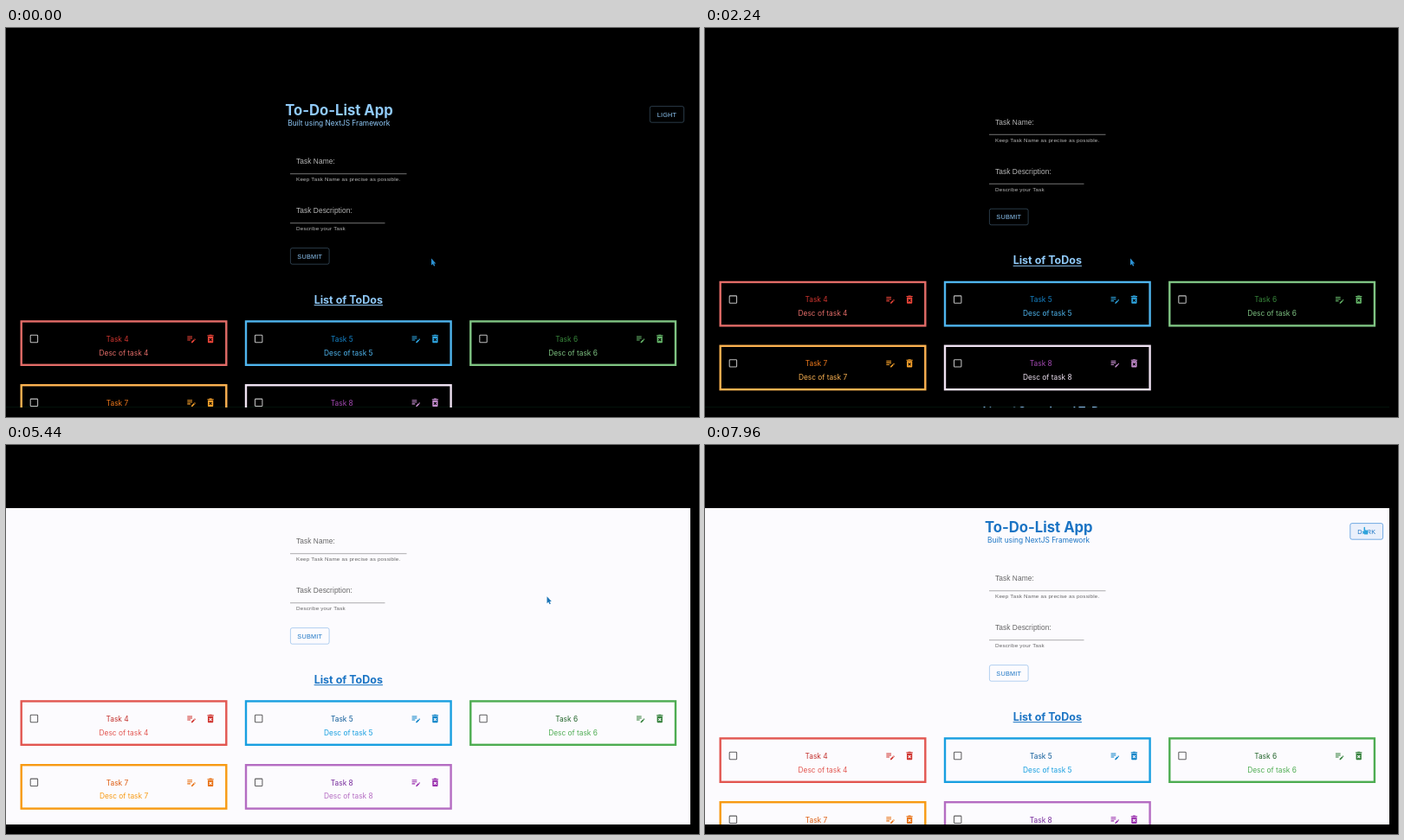
Recreate the animation shown at these times as an HTML page with a canvas. Size 800x450 px, loop 8000 ms.

```html
<!DOCTYPE html>
<html lang="en">
<head>
<meta charset="utf-8">
<title>To-Do list</title>
<style>
html, body { margin: 0; width: 100%; height: 100%; overflow: hidden; background: #000; }
canvas { display: block; width: 800px; height: 450px; }
</style>
</head>
<body>
<canvas id="stage" width="800" height="450"></canvas>
<script>
const ctx = document.getElementById('stage').getContext('2d');
const LOOP = 8000;
const S = 800 / 1536;
const SANS = '"Liberation Sans", Arial, sans-serif';
const INTER = 'Inter, sans-serif';

// Each palette entry is [light, main, dark].
const DARK = {
  bg: '#000', primary: '#90caf9', rgb: '144,202,249',
  label: 'rgba(255,255,255,.72)', line: 'rgba(255,255,255,.45)', box: 'rgba(255,255,255,.75)',
  outline: 0.32, button: 'LIGHT', buttonX: 743.3, arrow: '#2b8fd0',
  red: ['#e36c68', '#ee4539', '#d0352f'],
  blue: ['#4fb5ee', '#2fa8e4', '#1583c8'],
  green: ['#7fc483', '#66b86a', '#38883c'],
  orange: ['#fcb251', '#fba42c', '#f07a1c'],
  purple: ['#efe2f2', '#c88fd2', '#a54ab4']
};
const LIGHT = {
  bg: '#fcfbfe', primary: '#1b74c4', rgb: '25,118,210',
  label: 'rgba(0,0,0,.6)', line: 'rgba(0,0,0,.32)', box: 'rgba(0,0,0,.62)',
  outline: 0.36, button: 'DARK', buttonX: 744.8, arrow: '#1a74b6',
  red: ['#e25650', '#d0342f', '#c22e2a'],
  blue: ['#189fe0', '#0d84c8', '#0c5a98'],
  green: ['#4dac51', '#33803a', '#22642a'],
  orange: ['#f79a12', '#e87012', '#dd5a0c'],
  purple: ['#b46cc2', '#982cac', '#74279a']
};

const CARDS = ['red', 'blue', 'green', 'orange', 'purple'];
const DONE = ['green', 'blue', 'orange'];

const EDIT = new Path2D('M3 10h11v2H3zM3 8h11V6H3zM3 16h7v-2H3zM18.01 12.87l.71-.71c.39-.39 1.02-.39 1.41 0l.71.71c.39.39.39 1.02 0 1.41l-.71.71zM17.3 13.58l-5.3 5.3V21h2.12l5.3-5.3z');
const TRASH = new Path2D('M6 19c0 1.1.9 2 2 2h8c1.1 0 2-.9 2-2V7H6zM8.46 11.88l1.41-1.41L12 12.59l2.12-2.12 1.41 1.41L13.41 14l2.12 2.12-1.41 1.41L12 15.41l-2.12 2.12-1.41-1.41L10.59 14zM15.5 4l-1-1h-5l-1 1H5v2h14V4z');
const ARROW = new Path2D('M0 0V8L1.8 6.4L3 9L4.3 8.4L3.1 5.9H5.3z');
const HAND = new Path2D('M0 .8C0-.2 1.6-.2 1.6.8V3.4L4.4 4Q5.3 4.3 5.2 5.3L4.7 8.8H.6L-1.8 5.8C-2.2 5-1.2 4.4 0 5.4z');

// Keys are [time, value, ...].
const SCROLL = [
  [640, 0], [960, 90], [1530, 90], [1640, 0],
  [2080, 0], [2400, 90], [2720, 90], [2840, 0],
  [5080, 0], [5400, 43], [6799, 43], [6800, 0]
];
const POINTER = [
  [2940, 491, 266.5], [3340, 733, 151], [3540, 733, 151], [3980, 770.5, 105.5],
  [4600, 770.5, 105.5], [5040, 624.5, 175.2],
  [7360, 624.5, 175.2], [7760, 760.5, 94.8]
];
const THEME_AT = 4540, CLICK_AT = 4240;

function sample(keys, t) {
  const next = keys.findIndex(k => k[0] > t);
  if (next < 0) return keys[keys.length - 1].slice(1);
  if (next === 0) return keys[0].slice(1);
  const a = keys[next - 1], b = keys[next];
  const p = (t - a[0]) / (b[0] - a[0]);
  const e = p * p * (3 - 2 * p);
  return a.slice(1).map((v, i) => v + (b[i + 1] - v) * e);
}

function text(str, x, y, font, color, align = 'left', spacing = 0) {
  ctx.font = font;
  ctx.fillStyle = color;
  ctx.textAlign = align;
  ctx.letterSpacing = spacing + 'px';
  ctx.fillText(str, x, y);
  return ctx.measureText(str).width;
}

function heading(str, y, th) {
  const w = text(str, 395.3, y, `700 ${24 * S}px ${INTER}`, th.primary, 'center');
  ctx.fillRect(395.3 - w / 2, y + 1.4, w, 1);
}

function icon(path, cx, cy, color) {
  ctx.save();
  ctx.translate(cx - 12 * S, cy - 12 * S);
  ctx.scale(S, S);
  ctx.fillStyle = color;
  ctx.fill(path, 'evenodd');
  ctx.restore();
}

function button(label, x, y, w, th, hover, ripple) {
  const h = 18.6;
  ctx.save();
  ctx.beginPath();
  ctx.roundRect(x, y, w, h, 2.1);
  if (hover) {
    ctx.fillStyle = `rgba(${th.rgb},.08)`;
    ctx.fill();
  }
  ctx.lineWidth = 0.9;
  ctx.strokeStyle = `rgba(${th.rgb},${hover ? 0.65 : th.outline})`;
  ctx.stroke();
  if (ripple) {
    ctx.clip();
    ctx.beginPath();
    ctx.arc(ripple.x, ripple.y, ripple.r, 0, 7);
    ctx.fillStyle = `rgba(${th.rgb},.22)`;
    ctx.fill();
  }
  ctx.restore();
  text(label, x + w / 2, y + 11.9, `${14 * S}px ${SANS}`, th.primary, 'center', 0.4 * S);
}

function field(label, hint, y, w, th) {
  text(label, 335, y, `${16 * S}px ${SANS}`, th.label, 'left', 0.15 * S);
  ctx.fillStyle = th.line;
  ctx.fillRect(328, y + 11, w, 1);
  text(hint, 335, y + 20.2, `${12 * S}px ${SANS}`, th.label, 'left', 0.4 * S);
}

function frameBox(x, y, w, color) {
  ctx.strokeStyle = color;
  ctx.lineWidth = 2.4;
  ctx.strokeRect(x + 1.2, y + 1.2, w - 2.4, 50.4);
}

function card(i, th) {
  const x = 16.5 + (i % 3) * 259.3;
  const y = 338.2 + Math.floor(i / 3) * 73.8;
  const [light, main, dark] = th[CARDS[i]];
  const mid = y + 21.3;
  const font = `${16 * S}px ${INTER}`;
  frameBox(x, y, 239, light);
  ctx.strokeStyle = th.box;
  ctx.lineWidth = 1.05;
  ctx.beginPath();
  ctx.roundRect(x + 11.7, mid - 4.2, 8.4, 8.4, 0.8);
  ctx.stroke();
  text('Task ' + (i + 4), x + 112, y + 24.5, font, dark, 'center');
  text('Desc of task ' + (i + 4), x + 119.5, y + 40.4, font, light, 'center');
  icon(EDIT, x + 197.5, mid, main);
  icon(TRASH, x + 219.6, mid, main);
}

function page(th, hover, ripple) {
  const shift = th === LIGHT ? 0.8 : 0;
  text('To-Do-List App', 384.5 + shift, 101.2, `700 ${32 * S}px ${INTER}`, th.primary, 'center');
  text('Built using NextJS Framework', 384.3 + shift, 113, `${16 * S}px ${INTER}`, th.primary, 'center');
  button(th.button, th.buttonX, 90.6, 782.6 - th.buttonX, th, hover, ripple);
  field('Task Name:', 'Keep Task Name as precise as possible.', 157.2, 134.5, th);
  field('Task Description:', 'Describe your Task', 214.2, 109.5, th);
  button('SUBMIT', 328.4, 254.6, 44.7, th);
  heading('List of ToDos', 318.7, th);
  CARDS.forEach((_, i) => card(i, th));
  heading('List of Completed ToDos', 493, th);
  DONE.forEach((name, i) => frameBox(16.7 + i * 258, 513, 237.5, th[name][0]));
}

function pointer(x, y, hand, th) {
  ctx.save();
  ctx.translate(x, y);
  ctx.lineJoin = 'round';
  ctx.lineWidth = 1;
  ctx.strokeStyle = th.bg;
  ctx.fillStyle = hand ? '#2ea3dc' : th.arrow;
  const shape = hand ? HAND : ARROW;
  ctx.stroke(shape);
  ctx.fill(shape);
  ctx.restore();
}

function draw(t) {
  const th = t >= THEME_AT ? LIGHT : DARK;
  const [scroll] = sample(SCROLL, t);
  const [px, py] = sample(POINTER, t);
  const hover = px > th.buttonX && px < 783 && py > 90 && py < 110 && scroll < 1;

  let ripple = null;
  if (t >= CLICK_AT && t < THEME_AT) {
    const p = Math.min(1, (t - CLICK_AT) / 550);
    ripple = { x: 771, y: 106, r: 34 * (1 - Math.pow(1 - p, 1.6)) };
  }

  ctx.fillStyle = '#000';
  ctx.fillRect(0, 0, 800, 450);
  ctx.save();
  ctx.beginPath();
  ctx.rect(0, 73, 790, 366);
  ctx.clip();
  ctx.fillStyle = th.bg;
  ctx.fillRect(0, 73, 790, 366);
  if (th === DARK) {
    ctx.fillStyle = '#03120a';
    ctx.fillRect(0, 438, 790, 1);
  }
  ctx.translate(0, -scroll);
  page(th, hover, ripple);
  ctx.restore();

  const overTrash = scroll > 86;
  pointer(px + (overTrash ? 2.5 : 0), py, hover || overTrash, th);
}

function tick(now) {
  draw(now % LOOP);
  requestAnimationFrame(tick);
}
requestAnimationFrame(tick);
</script>
</body>
</html>
```
